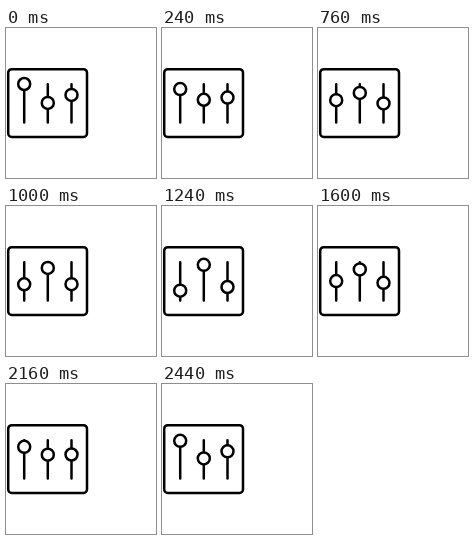
Animation, 150 px wide and 150 px high, one loop 2480 ms. Source, as an HTML page:

```html
<!DOCTYPE html>
<html lang="en">
<head>
<meta charset="utf-8">
<title>Sliders</title>
<style>
  html, body { margin: 0; width: 100%; height: 100%; overflow: hidden; background: #fff; }
  svg { display: block; width: 150px; height: 150px; }
</style>
</head>
<body>
<svg viewBox="0 0 150 150" fill="#fff" stroke="#000" stroke-width="2.5" stroke-linecap="round">
  <rect x="2.2" y="41.2" width="78.8" height="67.8" rx="3.5"/>
  <path d="M18.2 56.2V94.6M41.8 56.2V94.6M65.5 56.2V94.6"/>
  <circle cx="18.2" r="6"/>
  <circle cx="41.8" r="6"/>
  <circle cx="65.5" r="6"/>
</svg>
<script>
  const LOOP = 2480, STEP = 40;
  const knobs = document.querySelectorAll('circle');
  // Knob heights at the start, two thirds of the way, and at the turning point
  const stops = [[56, 73.6, 84.7], [74.9, 64.1, 58.8], [66.9, 76.2, 81]];
  const mix = (a, b, k) => a + (b - a) * k;

  function draw(now) {
    const t = Math.floor((now % LOOP) / STEP) * STEP;
    const p = 1 - Math.abs(1 - 2 * t / LOOP);
    stops.forEach(([start, mid, end], i) => {
      const y = p < 2 / 3 ? mix(start, mid, p * 1.5) : mix(mid, end, p * 3 - 2);
      knobs[i].setAttribute('cy', y);
    });
  }

  const origin = performance.now();
  function tick() {
    draw(performance.now() - origin);
    requestAnimationFrame(tick);
  }
  tick();
</script>
</body>
</html>
```
